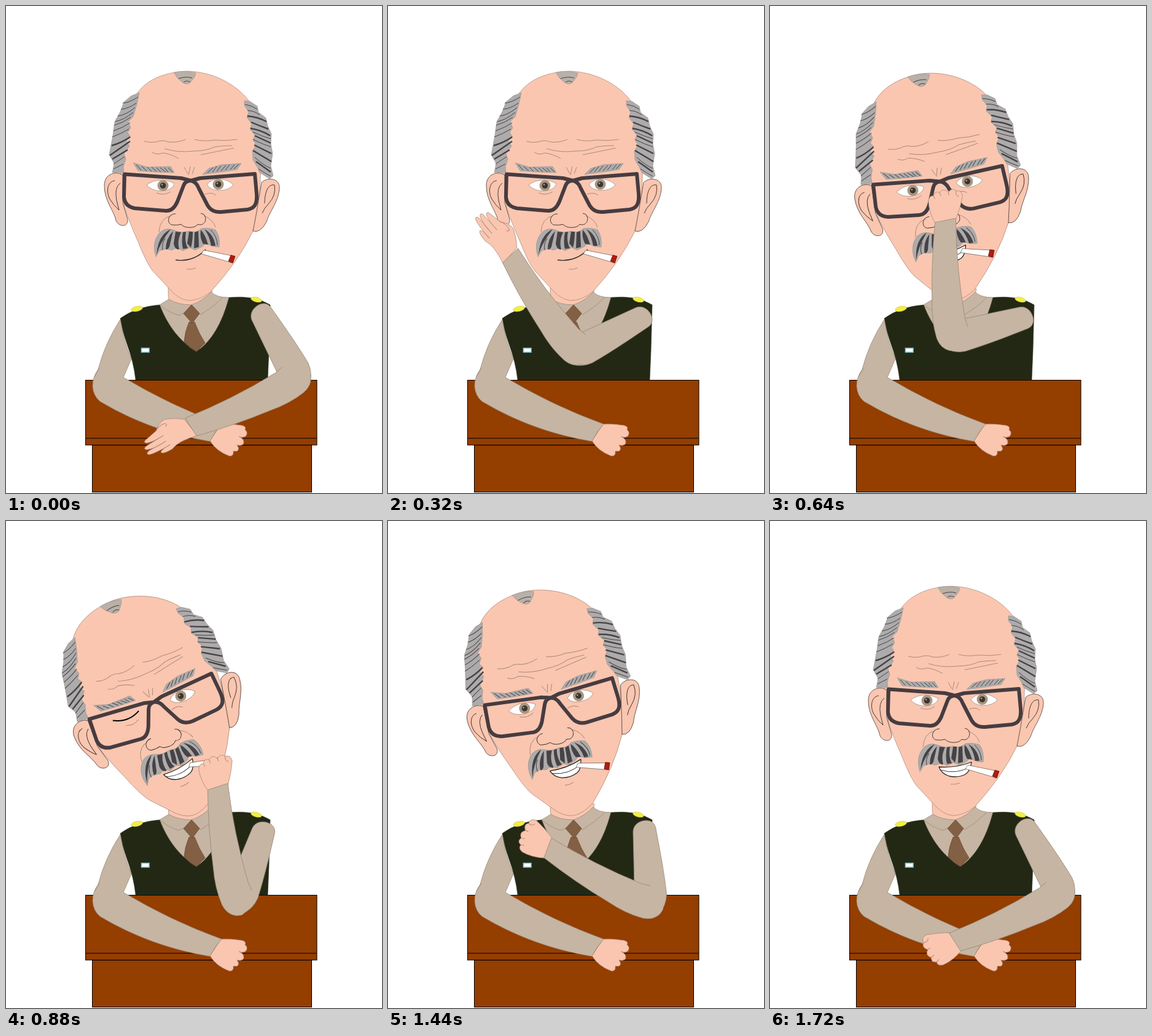
An HTML page that plays this animation: 612 px wide and 792 px high, repeating every 2000 ms.

```html
<!DOCTYPE html>
<html lang="en">
<head>
<meta charset="utf-8">
<title>Officer at the desk</title>
<style>
  html, body { margin: 0; width: 100%; height: 100%; overflow: hidden; background: #fff; }
  svg { display: block; width: 100%; height: 100%; }
  path { stroke-linejoin: round; }
  .skin { fill: #fac6b0; stroke: #a58474; stroke-width: .7; }
  .shirt { fill: #c6b5a3; stroke: #9a8978; stroke-width: .8; }
  .fill { fill: #c6b5a3; }
  .edge { fill: none; stroke: #9a8978; stroke-width: .8; }
  .hair { fill: #adabab; stroke: #99948f; stroke-width: .6; }
  .strand { fill: none; stroke: #464245; stroke-width: 1; }
  .bold { stroke-width: 2.4; }
  .lock { fill: #464245; }
  .crease { fill: none; stroke: #a58474; stroke-width: .9; }
  .ink { fill: none; stroke: #332b28; stroke-width: .9; }
  .desk { fill: #943e00; stroke: #000; stroke-width: 1; }
  .tie { fill: #835f44; stroke: #6b4a33; stroke-width: .8; }
  .white { fill: #fff; stroke: #8a7468; stroke-width: .6; }
</style>
</head>
<body>
<svg viewBox="0 0 612 792" preserveAspectRatio="none">
  <!-- torso -->
  <path class="skin" d="M264 456Q263 472 267 488H330L336 460Z"/>
  <path class="shirt" d="M250 486L265 477Q280 486 302 486Q320 480 334 465Q342 474 363 474L350 570H270Z"/>
  <path fill="#232815" stroke="#3b402b" stroke-width=".6" d="M186 508Q212 489 250 486Q270 538 310 562Q346 538 363 474Q404 470 430 486L428 560L426 608H211Q208 580 197 550Q189 528 186 508Z"/>
  <path class="edge" d="M250 486Q266 499 281 503L291 499L302 486L317 502Q338 489 353 474"/>
  <path class="tie" d="M298 514H307Q314 533 324 548L310 562Q298 556 290 546Q291 530 298 514Z"/>
  <path class="tie" d="M302 486L315 500L303 516L289 500Z"/>
  <g fill="#f1ee45" stroke="#cfc84c" stroke-width=".6">
    <ellipse cx="213" cy="492.500" rx="9.500" ry="4" transform="rotate(-12 213 492.500)"/>
    <ellipse cx="407.500" cy="477.500" rx="9" ry="3.800" transform="rotate(14 407.500 477.500)"/>
  </g>
  <rect x="220.500" y="556.500" width="12.500" height="6.500" fill="#fff" stroke="#85c9cf" stroke-width="1.600"/>

  <!-- desk -->
  <rect class="desk" x="140.500" y="714" width="357" height="76.500"/>
  <rect class="desk" x="129.500" y="608.500" width="376.500" height="105.500"/>
  <path class="desk" d="M129.500 703H506"/>

  <!-- resting arm -->
  <path class="skin" d="M350 680Q366 679 384 682Q392 684 389 689Q395 694 390 700Q384 703 379 700Q390 705 386 713Q381 716 376 714Q381 721 376 724L370 724Q371 732 364 732Q342 724 332 707Z"/>
  <path class="shirt" d="M186 510Q161 548 150 591Q141 603 141 618Q142 634 153 643Q235 692 332 708Q340 692 351 680Q268 650 191 604L204 574Q191 543 186 510Z"/>
  <path class="edge" d="M152 589L144 603"/>

  <g id="head">
    <path class="skin" d="M296 106C335 107 374 126 395 154C420 195 419 315 402 366Q378 416 333 465Q315 479 297 479Q280 477 265 459L239 431Q229 419 214 381Q201 352 193 328C180 270 183 185 212 144C230 117 263 107 296 106Z"/>
    <path class="hair" d="M217 141L204 146L192 156L186 172L177 188L174 210L168 242L176 256L173 271H192L191 262L195 249L192 240L201 228L196 219L203 213L198 206L203 198L199 188L207 180L213 160Z"/>
    <path class="strand" d="M215 148Q201 157 190 158M212 158Q199 167 187 168M210 165Q196 177 182 179M207 173Q192 185 178 188M203 181Q190 190 176 194M202 190Q190 198 175 203M200 200Q187 208 173 213M193 245L175 257M191 257L175 265"/>
    <path class="strand bold" d="M202 213Q187 223 172 227M202 220L169 243M198 234L173 249"/>
    <path class="hair" d="M388 154L397 155L409 163L411 173L423 182L426 195L432 208L431 224L434 240L431 260L435 276L429 281L413 271L409 262L402 250L401 236L407 226L402 218L405 210L397 200L400 192L392 181L395 172L388 162Z"/>
    <path class="strand" d="M389 160Q401 162 409 168M393 170Q403 170 413 177M402 205Q417 212 431 216M402 217Q418 225 431 229M405 246Q420 260 431 264M411 265Q422 272 431 277"/>
    <path class="strand bold" d="M393 179Q409 180 424 188M399 189Q413 195 427 200M398 199Q416 202 430 211M405 211L431 223M404 226L432 240M402 235L432 253M407 253L431 270"/>
    <path fill="#b9b0a8" stroke="#9a9189" stroke-width=".6" d="M273 108Q291 104 309 109Q308 117 298 126Q291 128 287 124L279 117Z"/>
    <path class="strand" d="M281 118Q293 114 303 117M289 124Q295 120 300 124"/>

    <path class="skin" style="stroke:#332b28" d="M190 275C180 268 160 272 160 292C160 317 176 333 179 349C183 359 199 361 198 347L190 320Z"/>
    <path class="ink" d="M177 284C164 286 163 303 169 314Q175 324 184 332M186 288Q176 295 180 316L184 332"/>
    <path class="skin" style="stroke:#332b28" d="M416 287C425 278 447 279 445 298C443 319 429 334 424 351Q414 370 402 366L407 340Z"/>
    <path class="ink" d="M437 291C426 289 421 304 421 321M437 291Q440 308 427 322Q420 329 417 337"/>

    <path class="crease" d="M225 220Q235 223 245 221Q255 217 264 221Q278 223 292 217M307 217Q322 221 339 218Q358 220 376 217M258 232Q280 239 305 236Q325 236 340 229Q354 227 368 227M238 238Q246 243 255 239Q267 240 281 248M317 242L371 231M290 262L296 273M300 261L297 275M307 262L303 273"/>
    <path class="hair" d="M207 255L230 262L268 261L274 271L243 270L215 268Z"/>
    <path class="hair" d="M320 274L330 264L351 258L383 256L376 266L350 270Z"/>
    <path class="strand" d="M212 258L220 267M221 261L229 268M230 262L237 269M237 262L245 269M245 263L252 270M251 263L260 270M258 263L264 270M264 263L271 270M328 271L337 263M336 270L343 261M343 269L350 260M350 268L358 259M357 267L364 258M365 266L372 258M371 265L379 257"/>

    <g id="leftEye">
      <path class="white" d="M229 291Q239 283 254 283Q267 284 274 289Q271 300 252 301Q236 300 229 291Z"/>
      <circle cx="255.500" cy="292" r="9" fill="#aa967f"/><circle cx="255.500" cy="292" r="4.800" fill="#3a3531"/><circle cx="254" cy="290.500" r="1.300" fill="#a9a7a4"/>
    </g>
    <path id="wink" fill="none" stroke="#000" stroke-width="2" d="M228 289Q251 301 273 289"/>
    <path class="white" d="M327 290Q335 281 348 281Q363 283 370 291Q363 300 346 300Q331 299 327 290Z"/>
    <circle cx="345.500" cy="290" r="9" fill="#aa967f"/><circle cx="345.500" cy="290" r="4.800" fill="#3a3531"/><circle cx="344" cy="288.500" r="1.300" fill="#a9a7a4"/>
    <path class="crease" d="M245 304Q257 309 268 302M324 306Q335 302 342 308M249 368Q250 345 269 341M322 341Q337 347 341 360"/>
    <path fill="none" stroke="#463c40" stroke-width="6" d="M193 273.500L285 280L301 284L316 280L405 273L408 306C409 323 404 329 393 331L350 335Q335 336 328 324L314 297Q310 286 301 284Q292 284 289 292L279 318Q272 334 260 333L210 329Q193 326 192 310Z"/>
    <path class="ink" d="M276 338C263 338 261 353 270 356Q279 357 285 355C290 362 308 362 312 355C322 359 329 347 322 339L317 337"/>

    <path class="hair" d="M244 408Q237 386 248 371Q257 359 272 364Q285 370 298 366Q309 370 318 362Q331 360 341 364Q349 375 347 392L336 391L325 386L320 391L308 397L299 393L288 398L279 393L270 397L259 395L250 398Z"/>
    <path class="lock" d="M268 363Q247 373 245 405Q250 386 268 363ZM272 366Q260 378 260 396Q266 396 267 387ZM276 367L285 368Q278 382 282 396Q274 396 273 386ZM288 368L293 367Q290 383 296 394L288 395Q285 383 288 368ZM298 367L304 367Q304 382 301 393L295 386ZM307 368L313 366L314 392L306 394ZM317 364Q324 371 329 388L321 387Q315 377 317 364ZM323 363Q338 371 341 390L334 390Q331 373 323 363Z"/>
    <path class="strand" d="M259 378Q253 386 255 397M333 364Q344 375 344 389"/>

    <path id="closedMouth" class="ink" style="stroke-width:1.400" d="M276 413C298 416 315 407 325 396"/>
    <g id="smile">
      <path fill="#fff" stroke="#2b2523" stroke-width="1.300" d="M275 400Q302 402 328 392Q326 407 318 412Q306 418 292 415Q279 411 275 400Z"/>
      <path class="ink" d="M278 405Q304 413 327 399"/>
    </g>
    <path class="white" style="stroke:#443" d="M322 397L372 407L369 418L318 403Z"/>
    <path fill="#b01c10" stroke="#500" stroke-width=".6" d="M366 405L373 407L369 418L362 415Z"/>
    <path class="crease" d="M294 428Q302 429 309 426"/>
  </g>

  <!-- moving arm: each part lies along its own x axis, starting at its joint -->
  <g id="upperArm">
    <path class="shirt" d="M95 21L-2 19C-13 18 -19 8 -19 -2C-19 -11 -14 -17 -6 -18C22 -22 60 -28 101 -31Q122 -30 134 -16Q142 0 130 12Z" />
  </g>
  <g id="forearm">
    <path id="openHand" class="skin" d="M-4 -17Q28 -12 42 -20Q60 -22 61 -17Q58 -13 42 -12Q68 -15 79 -13Q86 -10 78 -7L46 -4Q66 -8 80 -4Q86 0 78 2L46 6Q65 3 76 6Q82 10 73 12L53 18Q45 28 34 29Q22 27 4 16Z"/>
    <path id="thumb" class="crease" d="M56 17Q46 24 36 23Q31 20 37 18"/>
    <g id="fist">
      <path class="skin" d="M0 17Q17 25 37 30Q48 29 46 20Q53 15 45 7Q53 0 45 -7Q49 -15 40 -17Q42 -24 32 -26Q14 -26 -4 -17Z"/>
      <path class="crease" d="M46 20Q38 18 37 24M45 7L40 8M45 -7L39 -5M40 -17L35 -15"/>
    </g>
    <g transform="translate(-187 0)">
      <path class="fill" d="M189 17Q108 13 25 23L11 27Q-16 26 -26 4Q-27 -18 -4 -25Q25 -32 58 -29Q120 -27 184 -17Z"/>
      <path class="edge" d="M11 27L25 23Q108 13 189 17L184 -17Q120 -27 58 -29Q25 -32 -4 -25Q-21 -20 -26 -4"/>
    </g>
  </g>
</svg>
<script>
  const LOOP = 2000, STEP = 40, UPPER_LENGTH = 116, FOREARM_LENGTH = 187;

  // time, shoulder x, shoulder y, upper arm angle, forearm angle
  const armKeys = [
    [0, 418, 504, 63, 155.5],
    [160, 417, 508, 104.5, 199.4],
    [480, 403, 509, 204, 271],
    [880, 418, 508, 111.5, 260.5],
    [1200, 418, 508, 111.5, 260.5],
    [1280, 418, 505, 97.5, 243.4],
    [1560, 418, 507, 80, 183.2],
    [1720, 418, 504, 63, 155.5]
  ];
  const tiltKeys = [[0, 0], [480, 0], [880, -20.3], [1240, -20.3], [1720, 0]];

  const part = id => document.getElementById(id);
  const show = (id, on) => part(id).setAttribute('visibility', on ? 'visible' : 'hidden');
  const place = (id, x, y, angle) =>
    part(id).setAttribute('transform', `translate(${x} ${y}) rotate(${angle})`);

  function sample(keys, t) {
    const next = keys.findIndex(key => key[0] > t);
    if (next < 0) return keys[keys.length - 1].slice(1);
    const a = keys[next - 1], b = keys[next];
    const p = (t - a[0]) / (b[0] - a[0]);
    return a.slice(1).map((v, i) => v + (b[i + 1] - v) * p);
  }

  function along(x, y, angle, length) {
    const r = angle * Math.PI / 180;
    return [x + Math.cos(r) * length, y + Math.sin(r) * length];
  }

  function draw(now) {
    const t = Math.floor(now % LOOP / STEP) * STEP;
    const [x, y, upper, fore] = sample(armKeys, t);
    const [tilt] = sample(tiltKeys, t);
    const elbow = along(x, y, upper, UPPER_LENGTH);
    const wrist = along(...elbow, fore, FOREARM_LENGTH);

    part('head').setAttribute('transform', `rotate(${tilt} 300 458)`);
    place('upperArm', x, y, upper);
    place('forearm', ...wrist, fore);

    const smiling = t >= 560, fist = t >= 600, winking = t >= 720 && t < 1200;
    show('smile', smiling);
    show('closedMouth', !smiling);
    show('fist', fist);
    show('openHand', !fist);
    show('thumb', !fist);
    show('wink', winking);
    show('leftEye', !winking);
  }

  const start = performance.now();
  function tick() {
    draw(performance.now() - start);
    requestAnimationFrame(tick);
  }
  tick();
</script>
</body>
</html>
```
